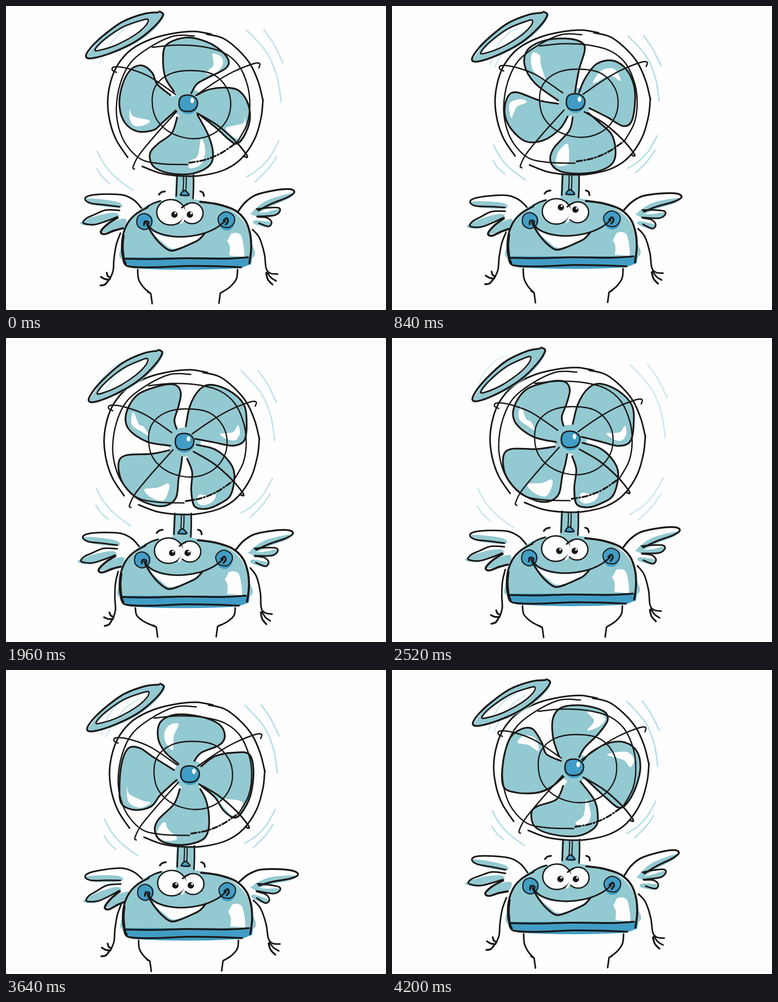
Write an HTML page that moves like this. It is 837x669 px and loops after 4480 ms.

```html
<!DOCTYPE html>
<html lang="en">
<head>
<meta charset="utf-8">
<title>Angel fan</title>
<style>
  html, body { margin: 0; width: 100%; height: 100%; overflow: hidden; background: #fefefe; }
  svg { display: block; width: 100vw; height: 100vh; }
  path { fill: none; stroke-linecap: round; stroke-linejoin: round; }
</style>
</head>
<body>
<svg id="stage" viewBox="0 0 837 669"></svg>
<script>
const INK = '#1b1918', TEAL = '#93c9d1', BLUE = '#419dc5', PALE = '#b5dfe8', WHITE = '#fefefe';
const STEP = 280, STEPS = 16;

// Smooth curve through "x,y x,y ..." points.
function curve(text, closed) {
  const p = text.split(' ').map(q => q.split(',').map(Number)), n = p.length;
  const at = i => closed ? p[(i + n) % n] : p[Math.max(0, Math.min(n - 1, i))];
  let d = 'M' + p[0];
  for (let i = 0; i < n - (closed ? 0 : 1); i++) {
    const [a, b, c, e] = [at(i - 1), at(i), at(i + 1), at(i + 2)];
    const h1 = b.map((v, k) => (v + (c[k] - a[k]) / 6).toFixed(1));
    const h2 = c.map((v, k) => (v - (e[k] - b[k]) / 6).toFixed(1));
    d += `C${h1} ${h2} ${c}`;
  }
  return d + (closed ? 'Z' : '');
}
const line = (pts, w = 3.5, color = INK, extra = '') =>
  `<path d="${curve(pts)}" stroke="${color}" stroke-width="${w}" ${extra}/>`;
const loop = (pts, w = 3.5) => `<path d="${curve(pts, true)}" stroke="${INK}" stroke-width="${w}"/>`;
const blob = (pts, color) => `<path d="${curve(pts, true)}" style="fill:${color}"/>`;
const oval = (x, y, rx, ry, fill, w = 0) =>
  `<ellipse cx="${x}" cy="${y}" rx="${rx}" ry="${ry}" fill="${fill}" stroke="${INK}" stroke-width="${w}"/>`;
const group = (id, inner) => `<g id="${id}">${inner}</g>`;

// Blade poses: outlines, then highlights, in stage coordinates.
const poses = [];
function blades(hub, outlines, lights) {
  const fills = outlines.map(b => `<path d="${curve(b)}L${hub}Z" style="fill:${TEAL}"/>`).join('');
  poses.push({ hub, art: oval(hub[0], hub[1], 36, 32, TEAL) +
    `<g transform="translate(1.5 1.5)">${fills}</g>` +
    lights.map(h => blob(h, WHITE)).join('') + outlines.map(b => line(b, 3.8)).join('') });
}
blades([401, 214], [
  '370,188 352,160 346,125 350,90 375,74 410,70 455,85 487,113 485,136 440,160 420,172 408,192',
  '420,196 450,183 490,180 515,188 533,215 537,250 525,285 508,303 490,293 465,270 425,238',
  '377,245 365,280 335,303 317,325 325,353 360,368 410,369 447,352 456,325 446,285 422,240',
  '374,230 343,258 325,273 290,276 262,257 250,220 256,175 275,140 300,131 322,147 333,172 362,196'
], ['455,105 474,112 477,130 461,148 440,148 457,130', '525,240 522,258 485,268 498,286 516,292 528,270',
  '430,292 439,318 430,348 405,357 404,342 422,330', '273,228 281,243 316,252 305,262 284,264 273,250']);
blades([404, 212], [
  '366,208 315,170 292,130 300,95 340,75 390,72 420,82 424,100 412,140 403,190',
  '412,190 425,160 450,128 485,120 515,138 533,175 535,215 527,255 508,264 475,245 435,225',
  '398,245 390,275 355,315 350,345 375,365 430,368 475,355 492,330 485,285 455,255 432,235',
  '366,215 325,208 275,190 255,200 248,235 262,270 295,298 335,295 370,270 387,243'
], ['308,105 310,140 337,163 328,130 325,108', '443,170 460,143 485,137 499,150 502,165 480,153',
  '386,303 366,322 362,350 386,349 390,330', '263,246 259,215 283,205 297,212 275,222']);
blades([404, 213], [
  '380,222 335,213 300,195 282,165 282,120 310,92 350,82 368,92 372,120 378,150 390,190',
  '398,190 402,140 415,100 440,83 470,88 510,115 535,155 528,185 490,192 450,200 428,210',
  '425,222 460,217 500,225 523,250 518,295 495,320 460,340 425,352 405,345 408,310 418,280 413,258',
  '376,236 350,233 300,222 262,235 260,275 285,325 325,350 355,348 378,320 390,285 392,260'
], ['300,122 310,108 335,103 352,112 355,130 335,119', '420,132 425,105 445,94 468,105 445,112',
  '472,240 495,238 510,260 505,280 498,283 495,260', '273,272 270,250 290,238 315,245 292,252']);
blades([393, 229], [
  '362,237 310,228 270,200 265,165 290,125 340,105 372,103 385,120 380,150 371,180 376,200',
  '396,195 405,150 425,115 450,103 490,115 523,145 530,185 525,225 500,237 460,230 417,222',
  '420,235 460,245 490,270 503,300 495,345 470,365 440,376 415,370 408,335 410,295 399,266',
  '360,247 320,255 265,258 248,275 255,315 285,350 325,368 355,368 375,350 380,310 385,285 388,262'
], ['280,163 277,190 300,207 315,215 303,195 293,190', '511,192 515,210 505,225 485,222 472,211 500,207',
  '462,345 455,360 435,368 421,361 425,345 445,347', '358,320 335,329 305,333 318,350 345,358 357,340']);
blades([393, 215], [
  '348,212 310,190 270,160 268,125 300,95 350,82 390,82 402,100 395,140 380,170 378,190',
  '388,188 400,155 430,125 470,118 505,135 525,155 530,190 525,212 490,213 445,210 415,215',
  '425,235 460,245 500,265 517,290 508,325 480,350 440,362 405,362 395,340 398,300 391,258',
  '348,225 335,236 310,225 270,210 250,225 252,270 270,305 310,340 345,335 370,310 378,280 380,253'
], ['369,92 372,120 360,130 375,140 385,120 383,98', '503,160 500,185 487,195 510,200 520,185 513,168',
  '474,262 472,290 480,318 505,305 512,285 495,268', '356,280 354,305 332,327 308,324 330,308']);
blades([405, 230], [
  '380,207 350,180 335,150 340,115 375,98 430,103 470,120 482,145 470,165 430,182 415,200',
  '430,212 460,190 500,182 535,185 545,220 540,270 525,305 505,325 480,310 460,280 430,255',
  '383,262 370,295 335,330 328,355 345,378 390,385 430,375 445,355 447,320 440,285 428,262',
  '376,242 340,275 320,300 285,308 255,295 250,260 255,205 270,172 295,172 325,192 370,220'
], ['362,120 380,119 370,145 367,176 351,158 350,135', '470,285 520,290 515,315 500,321 485,308',
  '350,335 357,350 377,371 352,376 333,364 338,345', '266,256 272,273 300,287 318,292 295,303 270,290']);
blades([402, 215], [
  '368,190 355,150 355,105 375,82 420,78 465,90 475,110 455,140 425,170 412,192',
  '420,200 440,180 480,160 515,160 540,180 547,215 538,255 520,290 500,303 470,280 425,238',
  '377,255 362,285 320,300 307,315 315,345 355,362 410,365 448,345 453,315 445,285 415,245',
  '378,235 350,258 320,270 275,270 245,255 245,200 260,150 285,130 310,130 330,160 340,185 372,200'
], ['430,92 455,95 470,108 455,125 430,133 445,112', '474,186 515,180 533,195 525,214 510,198',
  '428,285 438,320 425,342 404,337 422,320', '277,160 290,145 315,150 323,178 300,165']);

const breeze = [
  '568,52 590,84 610,125', '530,53 556,80 580,112 598,160 606,212', '601,297 580,334 555,360 530,376',
  '596,332 578,358 549,387', '201,320 219,352 245,380 279,405', '200,358 212,376 228,390',
  '261,34 236,47 210,78 192,123', '282,38 250,60 224,92 204,128'
].map((pts, i) => line(pts, i > 5 ? 2 : 3.5, PALE)).join('');

const neck =
  `<path d="M374 372H413V426H372Z" style="fill:${TEAL}"/>` +
  line('377,372 376,395 375,418') + line('413,372 413,400 412,424') +
  line('391,374 391,390 390,406', 2.5) + line('397,374 397,390 396,408', 2.5) +
  blob('382,416 387,409 393,406 400,411 404,418 393,419', BLUE) +
  line('384,416 388,409 394,406 400,411 403,416 393,417 384,416', 3);

const leftWing =
  blob('174,425 205,425 248,432 254,443 220,442 188,436', TEAL) +
  blob('163,478 195,463 240,455 247,466 215,474 190,484', TEAL) +
  blob('211,497 228,478 262,468 262,485 236,495', TEAL) +
  line('300,447 283,428 258,416 220,414 185,417 174,425 186,434 220,438 250,442') +
  line('250,450 220,449 195,459 176,468 171,478 195,481 222,473 245,464') +
  line('246,466 225,479 209,496 217,502 239,494 258,489', 4.5);
const rightWing =
  blob('543,453 575,428 630,412 622,424 585,440 556,455', TEAL) +
  blob('538,456 570,454 602,447 594,460 562,465', TEAL) +
  blob('547,480 548,472 572,474 584,477 578,487', TEAL) +
  line('512,451 527,432 550,416 590,406 625,403 635,410 620,421 585,435 556,450', 4) +
  line('552,447 577,444 600,444 603,452 590,461 553,463') +
  line('554,464 575,466 585,476 578,485 557,478');
const leftArm = line('252,500 243,525 238,555 236,582 229,600') + line('222,587 224,594 230,598', 4) +
  line('209,596 218,601 228,602', 4) + line('208,615 218,613 227,602', 4);
const rightArm = line('543,492 558,510 569,545 573,577 582,588 598,590') +
  line('575,586 584,598 595,605') + line('573,588 577,602 587,613', 4);

const shell =
  blob('262,560 257,520 268,480 300,445 340,429 390,424 440,430 490,446 524,475 538,515 538,556 400,558', TEAL) +
  `<path d="M259 553L542 553 540 568 516 577Q400 584 278 577L262 566Z" style="fill:${BLUE}"/>` +
  `<path d="M496 501Q510 496 518 505Q525 525 525 552L492 549Q496 525 487 518Z" style="fill:${WHITE}"/>` +
  line('264,568 256,545 257,508 268,478 286,458 312,443', 4) + line('260,563 257,530 259,505', 4.5) +
  line('311,442 325,434 340,429') + line('428,431 465,436 503,449 527,472 538,503 540,535 536,566', 4.5) +
  line('258,556 320,557 400,555 480,556 533,553', 4) +
  line('258,558 270,573 330,575 400,572 470,573 518,575', 4);

const face =
  line('337,415 342,410 350,408', 4) + line('428,408 434,411 436,418', 4) +
  oval(306, 474, 18, 18, BLUE) + oval(486, 474, 18, 20, BLUE) +
  loop('288,474 293,461 307,457 320,467 319,483 306,492 292,486', 2.5) +
  loop('467,470 473,458 486,453 501,461 503,475 492,487 474,484', 2.5) +
  blob('320,497 350,507 390,509 432,503 408,522 368,534 345,520', WHITE) +
  line('304,482 306,474 314,476 312,484', 4) + line('479,472 486,467 489,474 484,481', 4) +
  line('309,478 325,494 350,504 385,508 430,502 462,489 483,473') +
  line('311,482 322,501 340,523 361,538 382,534 410,522 425,514 437,501', 4) +
  oval(410, 456, 24, 23, WHITE, 3) + oval(363, 454, 31, 28, WHITE, 3) +
  `<path d="M386 441Q394 448 394 460Q392 470 386 477" stroke="${WHITE}" stroke-width="5"/>` +
  line('387,444 393,439 400,436') +
  group('pupilL', oval(371, 459, 7, 7, INK) + oval(373, 456, 2.3, 2.3, WHITE)) +
  group('pupilR', oval(405, 459, 7, 7, INK) + oval(408, 456, 2.3, 2.3, WHITE));

const cage =
  line('268,333 243,295 229,255 224,210 231,165 247,128 277,95 322,72 370,60 415,56 452,62') +
  line('442,62 478,71 511,96 538,128 556,168 566,208') +
  line('566,206 562,245 548,292 518,336 480,361 430,373 385,374 340,368 300,353') +
  line('415,66 370,66 318,90 275,124 252,170 243,225 249,270 266,307 297,337 340,347 400,349', 3) +
  line('322,91 375,86 430,89 478,102 512,130 532,175 537,220 530,262 509,300', 3) +
  line('404,345 440,338 475,323 510,299', 4, INK, 'stroke-dasharray="12 5 2 5"') +
  loop('322,210 330,175 360,150 405,142 455,150 486,180 495,218 484,255 455,282 412,292 365,280 332,250', 2.8) +
  line('243,146 234,141 239,134 270,138 315,155 373,194', 3) +
  line('557,136 559,127 545,127 500,145 460,168 418,197', 3) +
  line('283,359 280,354 293,328 330,283 376,232', 3) +
  line('421,236 465,262 505,297 529,326 531,333 525,331', 3.5) +
  oval(401, 217, 22, 21, BLUE) +
  loop('381,214 386,200 402,196 417,202 422,215 415,228 400,232 386,228', 3) +
  oval(410, 208, 4, 6, WHITE);

const rim = '176,110 190,90 215,60 260,31 305,15 338,12 346,21 326,49 287,79 235,103 190,114';
const hole = '196,96 215,75 258,46 300,31 313,30 308,43 285,63 245,85 208,97';
const halo = `<path transform="translate(2 1)" d="${curve(rim, true)}${curve(hole, true)}"
  style="fill:${TEAL}" fill-rule="evenodd"/>` + loop(hole, 3.2) +
  line('335,14 305,17 258,34 218,62 190,88 176,110 190,115 235,102 287,77 326,46 346,20 338,12', 4);

document.getElementById('stage').innerHTML =
  group('breeze', breeze) +
  group('body', neck + group('wingL', leftWing) + group('wingR', rightWing) +
    group('armL', leftArm) + group('armR', rightArm) + shell + face) +
  `<path id="legL" stroke="${INK}" stroke-width="3.5"/><path id="legR" stroke="${INK}" stroke-width="3.5"/>` +
  poses.map((p, i) => group('blades' + i, p.art)).join('') +
  group('cage', cage) + group('halo', halo);

const part = id => document.getElementById(id);
const move = (id, value) => part(id).setAttribute('transform', value);

// step, body x y, head x y, halo angle x y, wings R L, arms L R, feet xL xR y, breeze size opacity, blade angle
const keys = [
  [0, 0, 0, 0, 0, 0, 0, 0, 0, 0, 0, 0, 322, 469, 655, 1, .8, -8],
  [3, -1, -2, 3, -3, -2.5, -2, 4, 6, -4, 1, 0, 316, 475, 653, .9, 1, 17],
  [5, -2, -3, 3, -2, -3.7, -2, 6, 1, 0, -5, 5, 328, 466, 648, 1.03, .55, 44],
  [7, -5, 14, -8, 14, -4.6, 2, 20, 3, 0, -7, 4, 334, 463, 658, .97, .8, 42],
  [11, 0, 1, -8, 0, -6.9, -10, 9, 1, 0, -6, -1, 334, 476, 656, 1.07, .42, 35],
  [13, 2, 15, 4, 15, -.6, 2, 19, 12, -7, 0, -2, 320, 475, 663, .94, .95, -5],
  [15, 0, 1, 0, 0, .2, 2, 8, -4, 4, 0, -1, 316, 475, 656, .9, 1, -6]
];
const lift = { 4: -6, 8: 4, 9: 2, 10: 2, 12: -5, 14: 3 };

function leg(id, hip, foot, side) {
  const knee = [foot[0] - 3 * side, foot[1] - 22];
  const mid = (u, v) => [hip[0] + (knee[0] - hip[0]) * u, hip[1] + (knee[1] - hip[1]) * v];
  const bend = curve([hip, mid(.07, .4), mid(.45, .74), knee].join(' '));
  part(id).setAttribute('d', `${bend}L${foot}M${knee}l${-7 * side} -4`);
}

function pose(step) {
  const i = keys.findLastIndex(k => k[0] <= step);
  const a = keys[i], b = keys[i + 1] || a;
  const t = b === a ? 0 : (step - a[0]) / (b[0] - a[0]);
  const [, bx, by0, hx, hy0, ha, ox, oy, wr, wl, al, ar, fl, fr, fy0, size, alpha, spin] =
    a.map((v, k) => v + (b[k] - v) * t);
  const up = lift[step] || 0, by = by0 + up, hy = hy0 + up, fy = fy0 + up;

  move('body', `translate(${bx} ${by})`);
  move('cage', `translate(${hx} ${hy})`);
  move('halo', `translate(${ox} ${oy + up}) rotate(${ha} 261 64)`);
  move('wingR', `rotate(${wr} 512 451)`);
  move('wingL', `rotate(${wl} 300 447)`);
  move('armR', `rotate(${ar} 543 492)`);
  move('armL', `rotate(${al} 252 500)`);
  leg('legL', [290 + bx, 580 + by], [fl, fy], 1);
  leg('legR', [510 + bx, 580 + by], [fr, fy - 1], -1);
  move('breeze', `translate(${401 + hx} ${214 + hy}) scale(${size}) translate(-401 -214)`);
  part('breeze').setAttribute('opacity', alpha);
  move('pupilL', step === 3 ? 'translate(2 -14)' : '');
  move('pupilR', step === 3 ? 'translate(0 -9)' : '');

  const shown = t > .5 ? i + 1 : i, { hub } = poses[shown];
  poses.forEach((_, k) => part('blades' + k).style.display = k === shown ? '' : 'none');
  move('blades' + shown, t ? `translate(${401 + hx} ${214 + hy})
    rotate(${keys[shown][17] - spin}) translate(${-hub[0]} ${-hub[1]})` : '');
}

let last = -1;
function tick() {
  const step = Math.floor(performance.now() / STEP) % STEPS;
  if (step !== last) pose(last = step);
  requestAnimationFrame(tick);
}
tick();
</script>
</body>
</html>
```
